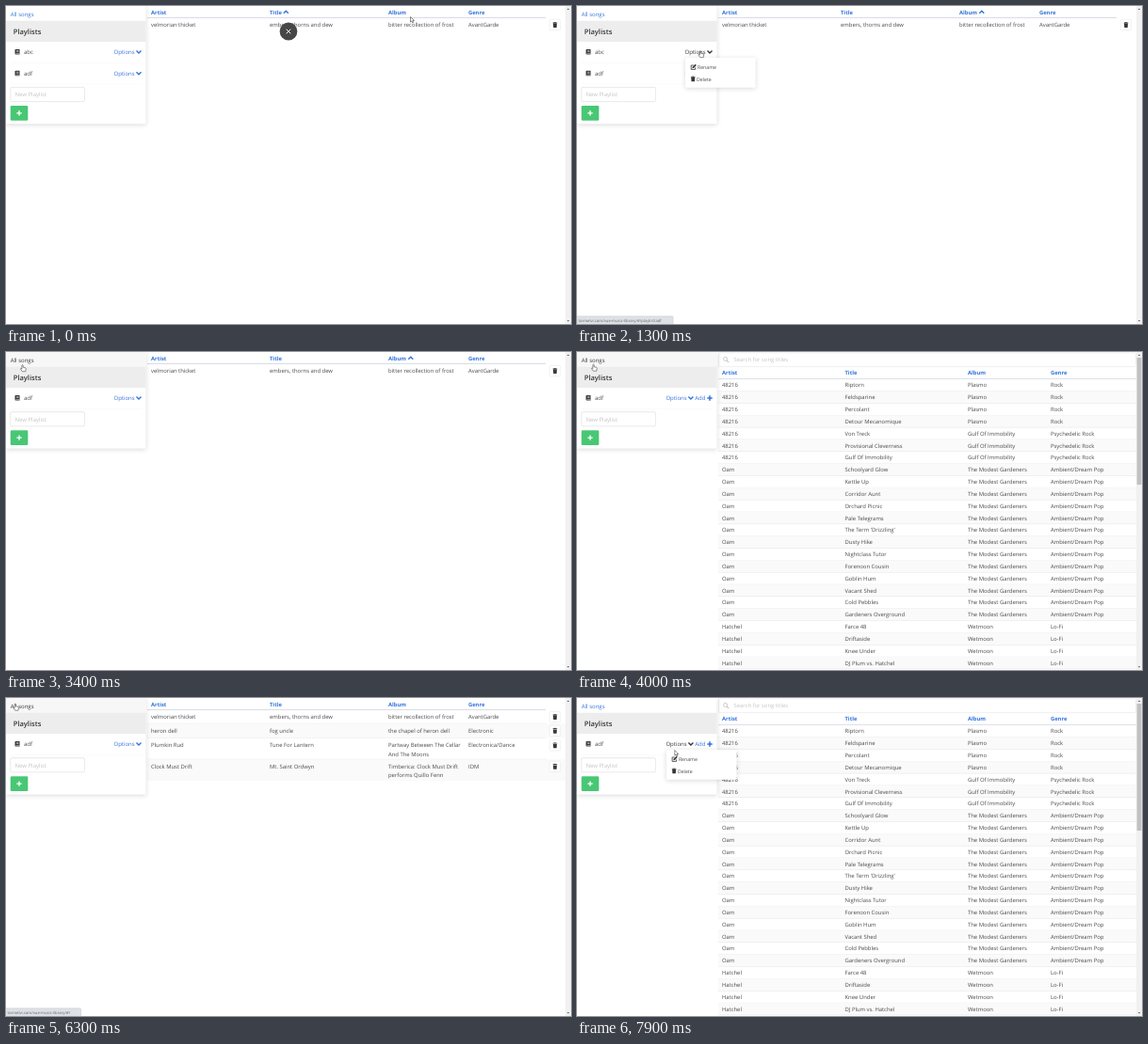
An HTML page that plays this animation: 600 px wide and 338 px high, repeating every 8000 ms.

```html
<!DOCTYPE html>
<html lang="en">
<head>
<meta charset="utf-8">
<title>Music library</title>
<style>
  html, body { margin: 0; width: 100%; height: 100%; overflow: hidden; background: #fff; }
  svg { display: block; width: 100vw; height: 100vh; }
  text { font-family: "Open Sans", "Noto Sans", sans-serif; font-size: 5.9px; fill: #4a4a4a; text-rendering: geometricPrecision; }
  .side { font-size: 6px; }
  .link { fill: #3273dc; }
  .head { fill: #3273dc; font-weight: 700; font-size: 5.8px; }
  .hint { fill: #c4c4c4; }
  .small { font-size: 5.2px; }
  .stat { font-size: 4.2px; fill: #62656a; }
  .shade { filter: drop-shadow(0 1.5px 2.5px rgba(10, 10, 10, .16)); }
</style>
</head>
<body>
<svg id="stage" viewBox="0 0 600 338" preserveAspectRatio="none" xmlns="http://www.w3.org/2000/svg"></svg>
<script>
const LOOP = 8000;
const BLUE = '#3273dc', DARK = '#363636';

const text = (x, y, s, cls = '', id = '') => `<text x="${x}" y="${y}" class="${cls}" id="${id}">${s}</text>`;
const rect = (x, y, w, h, fill, more = '') => `<rect x="${x}" y="${y}" width="${w}" height="${h}" fill="${fill}" ${more}/>`;
const path = (d, more = '') => `<path d="${d}" ${more}/>`;
const group = (id, body, more = '') => `<g id="${id}" ${more}>${body}</g>`;
const chevron = (x, y, up, color) => path(`M${x} ${y}l2.5 ${up ? -2.5 : 2.5}l2.5 ${up ? 2.5 : -2.5}`,
  `fill="none" stroke="${color}" stroke-width="1.4"`);
const plus = (x, y, r, color, w) => path(`M${x - r} ${y}h${2 * r}M${x} ${y - r}v${2 * r}`, `stroke="${color}" stroke-width="${w}"`);
const trash = (x, y) => path(`M${x - 2.3} ${y - 2.6}h1.4l.4-.5h1l.4.5h1.4v.8h-4.6zM${x - 2} ${y - 1.5}h4l-.3 4.3h-3.4z`, `fill="${DARK}"`);
const book = (x, y) => path(`M${x} ${y + .8}q0-.8.8-.8h4.2v5.6h-4.2q-.8 0-.8-.8z`, `fill="${DARK}"`) +
  path(`M${x + 1.4} ${y + 1.5}h2.6M${x + 1.4} ${y + 2.6}h2.6M${x + .8} ${y + 4.6}h4`, 'stroke="#fff" stroke-width=".5"');
const edit = (x, y) => path(`M${x + 3} ${y + 1}h-2.6v4.4h4.4v-2`, `fill="none" stroke="${DARK}" stroke-width=".8"`) +
  path(`M${x + 1.6} ${y + 4.2}l.3-1.5l2.9-2.9l1.2 1.2l-2.9 2.9z`, `fill="${DARK}"`);

// Playlist table
const listCols = [154, 280, 406, 491];
const songs = [
  [13, 27, 'velmorian thicket', 'embers, thorns and dew', ['bitter recollection of frost'], 'AvantGarde'],
  [27, 42.5, 'heron dell', 'fog uncle', ['the chapel of heron dell'], 'Electronic'],
  [42.5, 65, 'Plumkin Rud', 'Tune For Lantern', ['Partway Between The Cellar', 'And The Moons'], 'Electronica/Dance'],
  [65, 88, 'Clock Must Drift', 'Mt. Saint Ordwyn', ['Timberica: Clock Must Drift', 'performs Quillo Fenn'], 'IDM']
];
const heads = (cols, y) => ['Artist', 'Title', 'Album', 'Genre'].map((h, i) => text(cols[i], y, h, 'head')).join('');

function songRow([top, bottom, artist, title, album, genre], i) {
  const y = i ? top + 9.7 : 22;
  return (i % 2 ? rect(150, top, 444, bottom - top, '#fafafa') : '') +
    (i ? rect(150, top - .25, 423, .5, '#e9e9e9') : '') +
    text(154, y, artist) + text(280, y, title) + text(491, y, genre) +
    album.map((s, k) => text(406, y + k * 9.4, s)).join('') +
    rect(577.3, y - 7.6, 11.4, 11.4, '#fff', 'rx="1.2" stroke="#e2e2e2" stroke-width=".5"') + trash(583, y - 1.8);
}
const listView = heads(listCols, 8.7) + rect(150, 12.1, 423, .9, '#d5d9e0') + songRow(songs[0], 0) +
  group('more', songs.slice(1).map((s, i) => songRow(s, i + 1)).join('')) +
  group('sortTitle', chevron(294.8, 7.8, true, BLUE)) + group('sortAlbum', chevron(427.3, 7.8, true, BLUE));

// Library table
const libCols = [154, 284.5, 415, 503];
const albums = [
  ['48216', 'Plasmo', 'Rock', 'Riptorn|Feldsparine|Percolant|Detour Mecanomique'],
  ['48216', 'Gulf Of Immobility', 'Psychedelic Rock', 'Von Treck|Provisional Cleverness|Gulf Of Immobility'],
  ['Oam', 'The Modest Gardeners', 'Ambient/Dream Pop', "Schoolyard Glow|Kettle Up|Corridor Aunt|Orchard Picnic|Pale Telegrams|The Term 'Drizzling'|Dusty Hike|Nightclass Tutor|Forenoon Cousin|Goblin Hum|Vacant Shed|Cold Pebbles|Gardeners Overground"],
  ['Hatchel', 'Wetmoon', 'Lo-Fi', 'Farce 48|Driftaside|Knee Under|DJ Plum vs. Hatchel']
];
const tracks = albums.flatMap(([artist, album, genre, titles]) => titles.split('|').map(t => [artist, t, album, genre]));
const PITCH = 12.84;
const libView =
  rect(150.5, .8, 443, 14.8, '#fff', 'rx="1.2" stroke="#e4e4e4" stroke-width=".6"') +
  '<circle cx="157.6" cy="7.4" r="2" fill="none" stroke="#c4c4c4" stroke-width=".9"/>' +
  path('M159 8.9l2.2 2.2', 'stroke="#c4c4c4" stroke-width="1.1"') +
  text(166.5, 10.4, 'Search for song titles', 'hint') +
  heads(libCols, 24.4) + rect(150, 28, 444, .8, '#d5d9e0') +
  tracks.map((row, i) => {
    const y = 28.8 + i * PITCH;
    return (i % 2 ? rect(150, y, 444, PITCH, '#fafafa') : '') + rect(150, y + PITCH - .3, 444, .5, '#e2e2e2') +
      row.map((s, k) => text(libCols[k], y + 8.5, s)).join('');
  }).join('');

// Sidebar
const options = id => group(id, text(0, 51.1, 'Options', 'side') + path('M24 47.6l2.5 2.5l2.5-2.5', 'fill="none" stroke-width="1.4"'));
const entry = (id, name) => group(id, rect(5, 41, 27.5, 16, '#f2f2f2', 'rx="1.2" class="bg"') + book(9.5, 46) + text(19, 51.1, name, 'side'));
const sidebar =
  rect(0, 0, 148.5, 125.3, '#fff', 'id="panel" class="shade"') +
  rect(0, 0, 148.5, 16, '#f7f7f7', 'id="allBg"') + text(4.8, 10.5, 'All songs', 'side', 'all') +
  rect(0, 15.7, 148.5, 22.3, '#ededed') +
  `<text x="7.8" y="30" style="font-size:7.5px;font-weight:600;fill:${DARK}">Playlists</text>` +
  group('abcRow', entry('abc', 'abc') + options('optAbc') + rect(5, 60, 139, .4, '#f3f3f3')) +
  group('lower', entry('adf', 'adf') + options('optAdf') +
    group('add', text(125.2, 51.1, 'Add', 'side link') + plus(141, 49, 2.7, BLUE, 1.5)) +
    rect(5, 60, 139, .4, '#f3f3f3') +
    rect(4.8, 63.7, 78.6, 15.2, '#fff', 'rx="1.3" stroke="#dbdbdb" stroke-width=".6"') + text(9.5, 73.7, 'New Playlist', 'side hint') +
    rect(4.7, 83.3, 18.6, 15.7, '#48c774', 'rx="1.3"') + plus(14, 91.1, 2.7, '#fff', 1.3));

const menu = group('menu',
  rect(115, 55, 74.6, 31.8, '#fff', 'rx="1.3" class="shade"') +
  rect(115, 58.6, 74.6, 12.6, '#f5f5f5', 'id="hotRename"') + rect(115, 71.2, 74.6, 12.6, '#f5f5f5', 'id="hotDelete"') +
  edit(120.8, 62) + text(128, 66.8, 'Rename', 'small') + trash(123.2, 77.5) + text(127, 79.5, 'Delete', 'small'));

const scrollbar = rect(594, 0, 6, 338, '#f1f1f1') + rect(594.6, 6, 4.8, 135, '#c1c1c1', 'id="thumb"') +
  path('M595.7 4l1.3-1.6l1.3 1.6zM595.7 334l1.3 1.6l1.3-1.6z', 'fill="#606060"');

const closer = group('closer', '<circle cx="300" cy="27" r="9.4" fill="#474747"/>' +
  path('M297.7 24.7l4.6 4.6m0-4.6l-4.6 4.6', 'stroke="#fff" stroke-width="1"'));

const status = group('status', rect(-1, 329.8, 103, 9, '#dee1e6', 'id="statBg" rx="1" stroke="#c3c6ca" stroke-width=".5"') +
  text(1.5, 335.6, '', 'stat', 'statText'));

const cursor = group('cursor',
  path('M0 0v5.6l1.3-1.2l.9 2l1-.4l-.9-2h1.7z', 'id="arrow" fill="#fff" stroke="#222" stroke-width=".5"') +
  path('M-.6.5q.6-.9 1.2 0v2.2l2.6.7q.6.2.5 1l-.5 2.8h-3.4l-1.8-2.6q0-.8.8-.5l.6.5z', 'id="hand" fill="#fff" stroke="#222" stroke-width=".5"'));

const stage = document.getElementById('stage');
stage.innerHTML = rect(0, 0, 600, 338, '#fff') + group('list', listView) + group('lib', libView) +
  scrollbar + sidebar + menu + closer + status + cursor;

const $ = id => document.getElementById(id);
const show = (el, on) => { el.style.display = on ? '' : 'none'; };
const move = (id, x, y) => $(id).setAttribute('transform', `translate(${x} ${y})`);
const between = (v, a, b) => v >= a && v < b;

// Pointer stops: time, x, y
const stops = [
  [0, 429.5, 11.5], [200, 429.5, 11.5], [900, 24, 69], [980, 24, 69], [1250, 131, 47.5], [1400, 131, 47.5],
  [1800, 131, 74], [2100, 130.8, 76], [2500, 130.8, 76], [3300, 17.5, 15], [3450, 17.5, 13], [4000, 17.5, 13],
  [4500, 22.5, 49], [5700, 22.5, 49], [6250, 9.8, 6], [6500, 9.8, 6], [7150, 104, 47.5], [7450, 104, 47.5],
  [7850, 103.8, 55.5], [LOOP, 103.8, 55.5]
];
function pointer(t) {
  const i = stops.findIndex((s, k) => k && t <= s[0]);
  const [a, b] = [stops[i - 1], stops[i]];
  const p = (t - a[0]) / (b[0] - a[0]), e = p * p * (3 - 2 * p);
  return [a[1] + (b[1] - a[1]) * e, a[2] + (b[2] - a[2]) * e];
}

function statusAt(t) {
  const host = 'tormelvi.com/vue-music-library/#/';
  if (between(t, 800, 1500) || between(t, 4700, 6050)) return [host + 'playlist/adf', 103];
  return between(t, 6050, 6700) ? [host, 80.5] : null;
}

function render(t) {
  const [x, y] = pointer(t);
  const inLib = between(t, 4000, 4700) || t >= 6500;
  const gone = t >= 2500;
  const open = between(t, 1300, 2500) || t >= 7400;
  const shift = gone ? 0 : 22.7;
  const dx = inLib ? -20.1 : 0;

  show($('list'), !inLib);
  show($('lib'), inLib);
  show($('thumb'), inLib);
  show($('more'), t >= 4700);
  show($('sortTitle'), t < 200);
  show($('sortAlbum'), between(t, 200, 4000));
  show($('closer'), t < 500);
  move('closer', 0, -40 * Math.max(0, (t - 200) / 300));

  const onAll = y < 16 && x < 148;
  show($('allBg'), onAll);
  $('all').style.fill = onAll ? DARK : BLUE;
  $('panel').setAttribute('height', 102.6 + shift);
  show($('abcRow'), !gone);
  show($('add'), inLib);
  move('lower', 0, shift);

  const onLink = top => between(x, 5, 32.5) && between(y, top + 41, top + 57);
  const onOpt = top => between(x, 114 + dx, 144 + dx) && between(y, top + 45, top + 54);
  const overAbc = !gone && onLink(0), overAdf = onLink(shift);
  show($('abc').querySelector('.bg'), overAbc);
  show($('adf').querySelector('.bg'), overAdf);
  const paint = (id, dark) => {
    move(id, 114.5 + dx, 0);
    const color = dark ? DARK : BLUE;
    $(id).firstChild.style.fill = color;
    $(id).lastChild.style.stroke = color;
  };
  const optAbc = !gone && onOpt(0), optAdf = onOpt(shift);
  paint('optAbc', optAbc || (open && !gone));
  paint('optAdf', optAdf || (open && gone));

  const onRename = open && between(y, 58.6, 71.2), onDelete = open && between(y, 71.2, 83.8);
  show($('menu'), open);
  move('menu', dx, 0);
  show($('hotRename'), onRename);
  show($('hotDelete'), onDelete);

  const stat = statusAt(t);
  show($('status'), stat);
  if (stat) {
    $('statText').textContent = stat[0];
    $('statBg').setAttribute('width', stat[1]);
  }

  const hand = onAll || overAbc || overAdf || optAbc || optAdf || onRename || onDelete;
  show($('hand'), hand);
  show($('arrow'), !hand);
  move('cursor', x, y);
}

const start = performance.now();
function tick() {
  render((performance.now() - start) % LOOP);
  requestAnimationFrame(tick);
}
tick();
</script>
</body>
</html>
```
